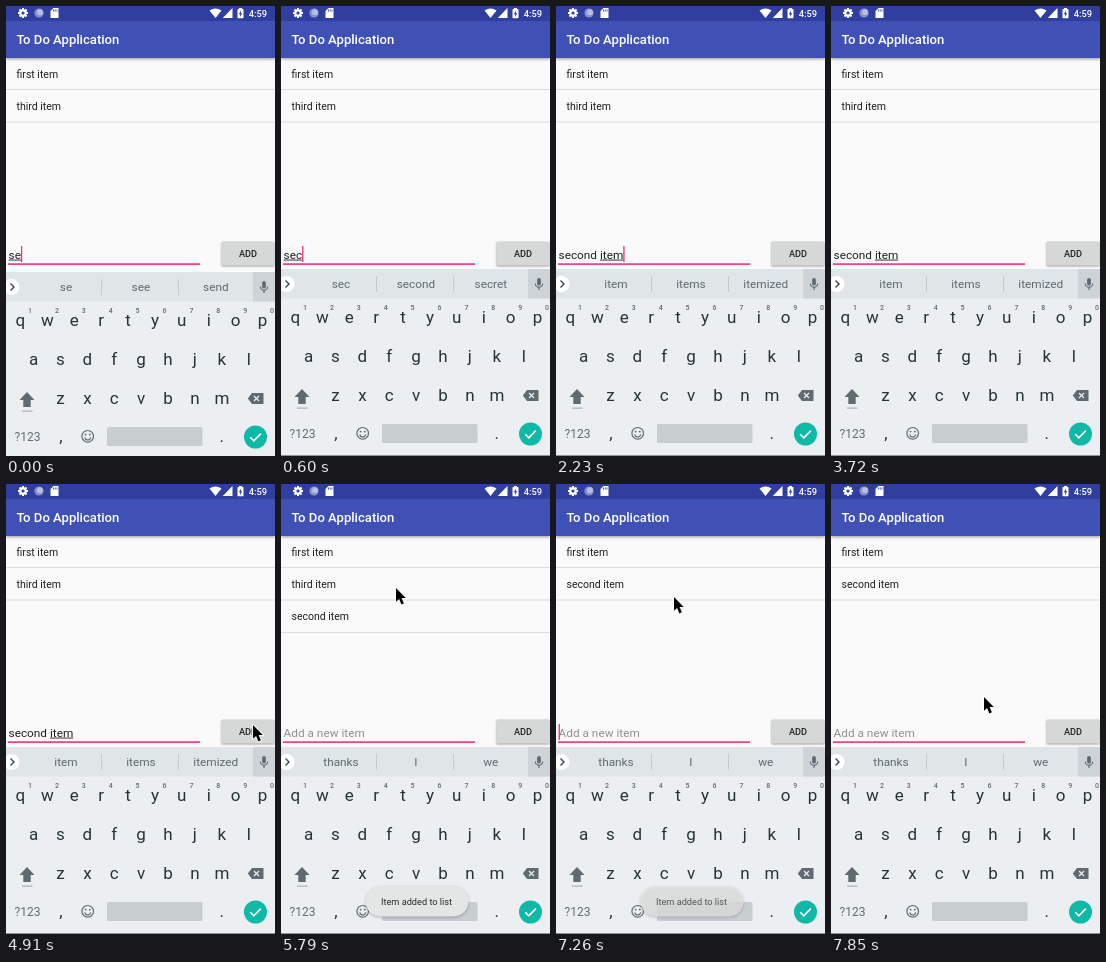
Write an HTML page with a canvas that moves like this. It is 269x450 px and loops after 8000 ms.

```html
<!DOCTYPE html>
<html lang="en">
<head>
<meta charset="utf-8">
<title>To Do Application</title>
<style>
html, body { margin: 0; width: 100%; height: 100%; overflow: hidden; background: #fafafa; }
canvas { display: block; width: 269px; height: 450px; }
</style>
</head>
<body>
<canvas id="stage"></canvas>
<script>
const W = 269, H = 450, LOOP = 8000;
const PINK = '#f0307f', INK = '#263238', GREY = '#5f6b71';
const canvas = document.getElementById('stage');
const ratio = window.devicePixelRatio || 1;
canvas.width = W * ratio;
canvas.height = H * ratio;
const ctx = canvas.getContext('2d');

// Each entry changes part of the screen state and holds until the next one.
const timeline = [
  [0, { drop: 3, typed: '', word: 'se', caret: true, hints: 'se see send',
        rows: ['first item', 'third item'], mouse: null, toast: 0, press: 0, ripple: 0 }],
  [150, { drop: 0 }],
  [600, { word: 'sec', hints: 'sec second secret' }],
  [1050, { word: 'seco', hints: 'second seconds secondary' }],
  [1200, { word: 'secon' }],
  [1350, { word: 'second' }],
  [1490, { typed: 'second ', word: '', hints: 'one half time' }],
  [1940, { word: 'i', hints: 'I in is' }],
  [2090, { word: 'ite', hints: 'item items itemized' }],
  [2230, { word: 'item' }],
  [2670, { caret: false }],
  [3270, { caret: true }],
  [3720, { caret: false }],
  [4170, { caret: true, mouse: [204, 440] }],
  [4320, { mouse: [216, 385] }],
  [4470, { mouse: [233, 312] }],
  [4620, { mouse: [244, 256] }],
  [4770, { mouse: [247, 242], caret: false }],
  [4910, { mouse: [247, 241] }],
  [5060, { mouse: [232, 224], typed: '', word: '', caret: true, hints: 'thanks I we',
           rows: ['first item', 'third item', 'second item'] }],
  [5200, { mouse: [158, 151] }],
  [5350, { mouse: [121, 112], toast: 0.25 }],
  [5500, { mouse: [115, 104], toast: 0.65 }],
  [5640, { toast: 0.9, caret: false }],
  [5790, { toast: 1 }],
  [6090, { caret: true }],
  [6530, { caret: false, press: 0.6, ripple: 18 }],
  [6670, { press: 1, ripple: 33.5, rows: ['first item', 'second item'] }],
  [6960, { press: 0.4 }],
  [7110, { press: 0, ripple: 0, caret: true }],
  [7260, { mouse: [118, 113], toast: 0.75 }],
  [7400, { mouse: [130, 142], toast: 0.35 }],
  [7550, { mouse: [142, 176], toast: 0, caret: false }],
  [7700, { mouse: [150, 203] }],
  [7850, { mouse: [153, 213] }]
];

function stateAt(t) {
  const state = {};
  for (const [start, change] of timeline) if (start <= t) Object.assign(state, change);
  return state;
}

function rect(x, y, w, h, color) {
  ctx.fillStyle = color;
  ctx.fillRect(x, y, w, h);
}

function text(str, x, y, size, color, align = 'left', weight = 400) {
  ctx.font = `${weight} ${size}px Roboto, sans-serif`;
  ctx.textAlign = align;
  ctx.fillStyle = color;
  ctx.fillText(str, x, y);
}

function disc(x, y, r, color) {
  ctx.beginPath();
  ctx.arc(x, y, r, 0, Math.PI * 2);
  ctx.fillStyle = color;
  ctx.fill();
}

function trace(points) {
  ctx.beginPath();
  for (const [x, y] of points) ctx.lineTo(x, y);
}

function poly(points, color) {
  trace(points);
  ctx.closePath();
  ctx.fillStyle = color;
  ctx.fill();
}

function line(points, color, width) {
  trace(points);
  ctx.strokeStyle = color;
  ctx.lineWidth = width;
  ctx.stroke();
}

function pill(x, y, w, h, r, color) {
  ctx.beginPath();
  ctx.roundRect(x, y, w, h, r);
  ctx.fillStyle = color;
  ctx.fill();
}

function withShadow(blur, dy, alpha, draw) {
  ctx.save();
  ctx.shadowColor = `rgba(0,0,0,${alpha})`;
  ctx.shadowBlur = blur * ratio;
  ctx.shadowOffsetY = dy * ratio;
  draw();
  ctx.restore();
}

function drawStatus() {
  rect(0, 0, W, 15, '#303f9f');
  for (let i = 0; i < 8; i++) {
    const a = i * Math.PI / 4;
    line([[17, 7], [17 + 5 * Math.cos(a), 7 + 5 * Math.sin(a)]], '#fff', 2);
  }
  disc(17, 7, 3.7, '#fff');
  disc(17, 7, 1.6, '#303f9f');
  disc(33, 7, 4.6, '#8791cb');
  disc(34, 6.2, 2.9, '#b9bfe2');
  poly([[47.5, 2], [52.5, 2], [52.5, 12], [44.5, 12], [44.5, 5]], '#fff');
  for (const x of [47, 48.8, 50.6]) rect(x, 3.4, 0.8, 2.2, '#303f9f');
  ctx.beginPath();
  ctx.moveTo(209.5, 12);
  ctx.lineTo(203.5, 4.6);
  ctx.quadraticCurveTo(209.5, 0.4, 215.5, 4.6);
  ctx.fillStyle = '#fff';
  ctx.fill();
  poly([[226.5, 2], [226.5, 12], [216.8, 12]], '#fff');
  rect(233, 2, 3, 1.5, '#fff');
  pill(231.5, 3, 6, 9.3, 0.7, '#fff');
  poly([[235, 4.5], [232.8, 8.2], [234.2, 8.2], [234, 11], [236.3, 7.2], [234.9, 7.2]], '#303f9f');
  text('4:59', 261, 10.7, 9.3, '#fff', 'right', 500);
}

function drawBar() {
  withShadow(3, 1, 0.4, () => rect(0, 15, W, 37, '#3f51b5'));
  text('To Do Application', 10.5, 38.3, 13.1, '#fff', 'left', 500);
  drawStatus();
}

function drawList(s) {
  s.rows.forEach((_, i) => rect(0, 83 + i * 32.5, W, 1, '#dcdcdc'));
  if (s.press) {
    ctx.save();
    ctx.globalAlpha = s.press;
    ctx.beginPath();
    ctx.rect(0, 83, W, 34);
    ctx.clip();
    rect(0, 83, W, 34, '#ececec');
    disc(120.5, 104, s.ripple, '#e2e2e2');
    ctx.restore();
  }
  s.rows.forEach((row, i) => text(row, 10.5, 71.6 + i * 32.4, 10.5, '#1f1f1f'));
}

function drawInput(s) {
  const x = 2.6, base = 252.5, size = 11.8;
  const full = s.typed + s.word;
  text(full || 'Add a new item', x, base, size, full ? '#212121' : '#8f8f8f');
  const start = x + ctx.measureText(s.typed).width;
  const end = full ? x + ctx.measureText(full).width : x;
  if (s.word) rect(start, 253.6, end - start, 0.9, '#212121');
  if (s.caret) rect(end, 240, 1.3, 16, PINK);
  rect(2, 257.3, 192, 1.6, PINK);
  withShadow(2, 1, 0.35, () => pill(215.5, 235.5, 53, 24, 1.3, '#d6d7d7'));
  text('ADD', 242, 251, 9.2, '#212121', 'center', 500);
}

function drawStrip(hints) {
  rect(0, 263, W, 29.5, '#e0e5e8');
  rect(247, 263, 22, 29.5, '#cdd3d7');
  disc(5.5, 278, 8, '#fff');
  line([[4.5, 274.5], [8, 278], [4.5, 281.5]], '#37474f', 1.4);
  hints.split(' ').forEach((hint, i) => text(hint, 60 + i * 74.9, 282.3, 11.8, GREY, 'center'));
  for (const x of [95, 172]) rect(x, 270, 1, 16, '#c3c9cc');
  pill(256.1, 272, 3.8, 7.6, 1.9, GREY);
  ctx.beginPath();
  ctx.arc(258, 277.6, 3.7, 0, Math.PI);
  ctx.strokeStyle = GREY;
  ctx.lineWidth = 1.1;
  ctx.stroke();
  line([[258, 281], [258, 284]], GREY, 1.2);
}

function drawSmiley(x, y) {
  ctx.strokeStyle = GREY;
  ctx.lineWidth = 1.2;
  ctx.beginPath();
  ctx.arc(x, y, 5.8, 0, Math.PI * 2);
  ctx.stroke();
  disc(x - 2.1, y - 1.7, 0.95, GREY);
  disc(x + 2.1, y - 1.7, 0.95, GREY);
  ctx.beginPath();
  ctx.arc(x, y + 0.7, 3, 0.15, Math.PI - 0.15);
  ctx.stroke();
}

function drawKeyboard(s) {
  ctx.save();
  ctx.translate(0, s.drop);
  rect(0, 263, W, 187, '#eceff1');
  drawStrip(s.hints);

  const pitch = 26.9;
  [['qwertyuiop', 14.4], ['asdfghjkl', 27.5], ['zxcvbnm', 54.5]].forEach(([keys, left], row) => {
    [...keys].forEach((key, i) => {
      const x = left + i * pitch;
      text(key, x, 317 + row * 38.9, 17, INK, 'center');
      if (!row) text((i + 1) % 10, x + 9.6, 304.3, 7, GREY, 'center', 500);
    });
  });

  poly([[21, 383], [28.5, 391], [24.7, 391], [24.7, 398], [17.3, 398], [17.3, 391], [13.5, 391]], GREY);
  rect(16, 401.5, 10.5, 1.2, '#a9b1b5');

  poly([[246, 384], [257.5, 384], [257.5, 395], [246, 395], [241.8, 389.5]], GREY);
  line([[248, 387], [253, 392]], '#eceff1', 1.3);
  line([[253, 387], [248, 392]], '#eceff1', 1.3);

  text('?123', 8.5, 431.5, 12, GREY);
  text(',', 55, 433, 17, INK, 'center');
  drawSmiley(81.7, 427.3);
  pill(101, 418, 95.5, 19, 1.5, '#c8cdd0');
  text('.', 215.7, 433, 17, INK, 'center');
  disc(249.5, 428, 11.5, '#10b9a6');
  line([[244.3, 428.3], [247.8, 431.8], [254.8, 424.6]], '#fff', 1.6);
  rect(0, 449, W, 1, '#8d9295');
  ctx.restore();
}

function drawToast(alpha) {
  ctx.save();
  ctx.globalAlpha = alpha;
  withShadow(3, 1, 0.25, () => pill(84.5, 402.5, 103, 30, 15, '#e4e5e5'));
  text('Item added to list', 135.5, 421, 9.2, '#2b2b2b', 'center');
  ctx.restore();
}

function drawMouse([x, y]) {
  ctx.save();
  ctx.translate(x, y);
  const shape = [[0, 0], [0, 13.8], [3.1, 11], [5.4, 16.4], [7.9, 15.3], [5.6, 10.1], [9.8, 10]];
  trace(shape);
  ctx.closePath();
  ctx.strokeStyle = '#fff';
  ctx.lineWidth = 1.8;
  ctx.lineJoin = 'round';
  ctx.stroke();
  poly(shape, '#000');
  ctx.restore();
}

function draw(t) {
  const s = stateAt(t);
  ctx.setTransform(ratio, 0, 0, ratio, 0, 0);
  rect(0, 0, W, H, '#fafafa');
  drawList(s);
  drawBar();
  drawInput(s);
  drawKeyboard(s);
  if (s.toast) drawToast(s.toast);
  if (s.mouse) drawMouse(s.mouse);
}

function tick() {
  draw(performance.now() % LOOP);
  requestAnimationFrame(tick);
}
tick();
</script>
</body>
</html>
```
